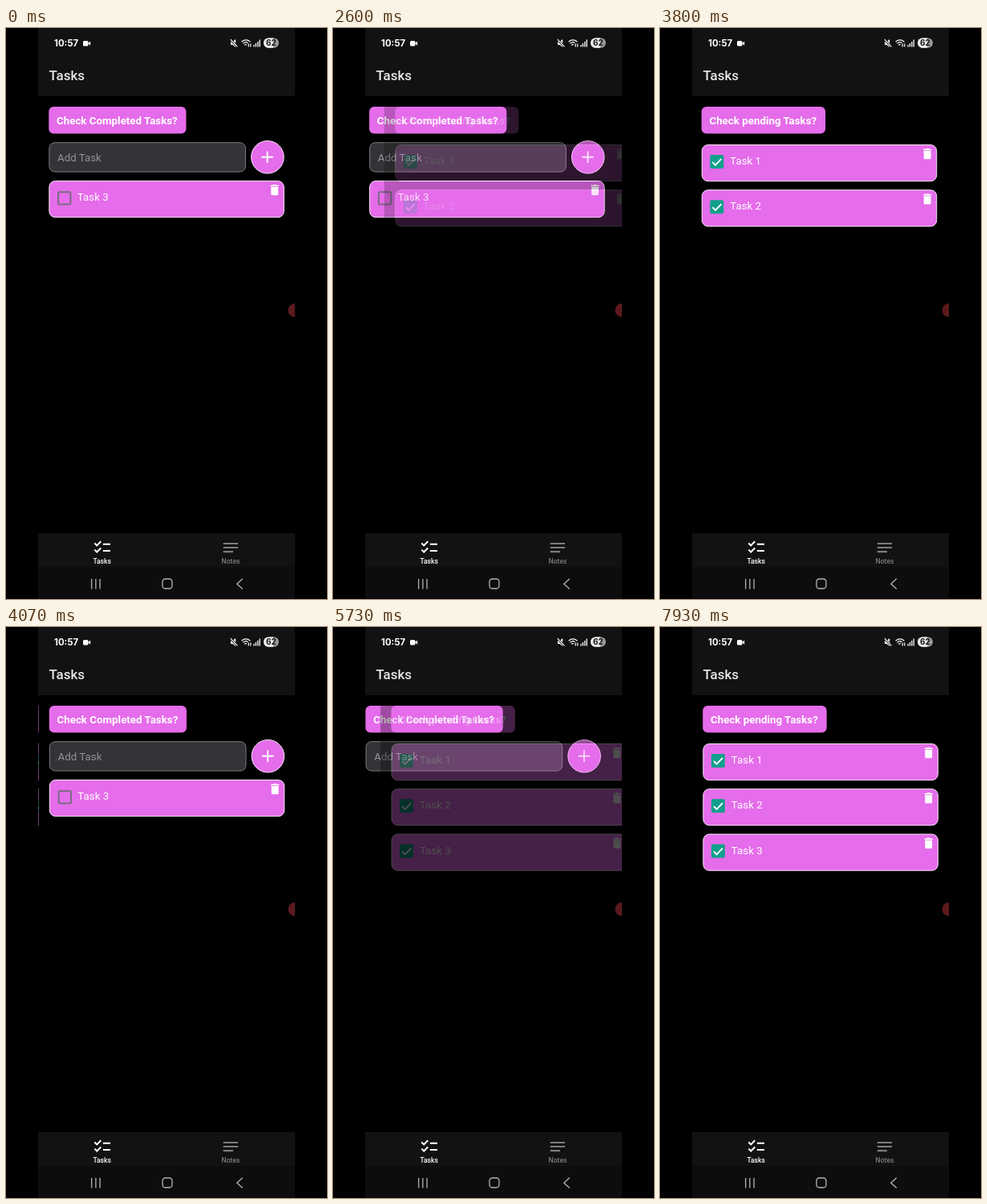
An HTML page for the animation above (8000 ms loop, 400 px wide and 711 px high).

```html
<!DOCTYPE html>
<html lang="en">
<head>
<meta charset="utf-8">
<title>Tasks</title>
<style>
  html, body { margin: 0; height: 100%; overflow: hidden; background: #000; }
  svg { display: block; width: 100vw; height: 100vh; }
  text { font-family: Roboto, sans-serif; font-size: 13.33px; fill: #fff; }
  .bold { font-weight: 700; }
  .medium { font-weight: 500; }
  .clock { font: 700 11.4px Inter, sans-serif; }
  .line { fill: none; stroke: #fff; }
</style>
</head>
<body>
<svg viewBox="0 0 400 711">
  <defs>
    <clipPath id="phone"><rect x="40" y="85" width="320" height="544"/></clipPath>
    <path id="trash" fill="#fff" d="M6 19c0 1.1.9 2 2 2h8c1.1 0 2-.9 2-2V7H6zM19 4h-3.5l-1-1h-5l-1 1H5v2h14z"/>
  </defs>
  <rect width="400" height="711"/>

  <g id="pages" clip-path="url(#phone)"></g>
  <circle cx="360" cy="351.5" r="8.5" fill="#5c191d" clip-path="url(#phone)"/>

  <!-- status bar and header -->
  <rect x="40" width="320" height="85" fill="#121113"/>
  <text class="clock" x="60" y="22.8">10:57</text>
  <rect x="96" y="16" width="6.5" height="6.5" rx="1.5" fill="#fff"/>
  <path d="M102 19.2l3.2-2.6v5.2z" fill="#fff"/>
  <path d="M280 17h2.4l3.8-3v10l-3.8-3H280z" fill="#fff"/>
  <path d="M279.5 14l9 9.5" stroke="#121113" stroke-width="2.6"/>
  <path class="line" d="M279.8 14.2l8.6 9.2" stroke-width="1.2"/>
  <path class="line" d="M293.6 17.2q5.4-4.6 10.8 0M295.4 19.4q3.6-3 6 -.6M297.2 21.4q1.6-1.4 2.6-.4M302.2 23.5v-4M304.8 19.5v4" stroke-width="1.2"/>
  <path class="line" d="M309 23.5v-2.5M311.4 23.5v-4.5M313.8 23.5v-6.5M316.2 23.5v-9" stroke-width="1.3"/>
  <rect x="321" y="12.5" width="19" height="12.2" rx="6.1" fill="#9a9a9c"/>
  <path d="M333 12.5h-5.9a6.1 6.1 0 0 0 0 12.2h5.9z" fill="#eee"/>
  <text class="clock" x="330.5" y="22.4" text-anchor="middle" style="font-size:10px;fill:#18171a">62</text>
  <text class="medium" x="53.5" y="65" style="font-size:17px;fill:#e8e8ea">Tasks</text>

  <!-- tab bar -->
  <rect x="40" y="629" width="320" height="42" fill="#121113"/>
  <path transform="translate(107.6 634.6) scale(1.02)" fill="#fff" d="M22 7h-9v2h9zm0 8h-9v2h9zM5.54 11L2 7.46l1.41-1.41 2.12 2.12 4.24-4.24 1.41 1.41zm0 8L2 15.46l1.41-1.41 2.12 2.12 4.24-4.24 1.41 1.41z"/>
  <path transform="translate(267.7 634.8) scale(1.02)" fill="#7c7b7e" d="M3 18h12v-2H3zM3 6v2h18V6zm0 7h18v-2H3z"/>
  <g class="medium" text-anchor="middle">
    <text x="119.7" y="667" style="font-size:8.6px">Tasks</text>
    <text x="280" y="667" style="font-size:8.6px;fill:#7c7b7e">Notes</text>
  </g>

  <!-- system navigation -->
  <rect x="40" y="671" width="320" height="40" fill="#0d0c0e"/>
  <g class="line" style="stroke:#b4b3b6" stroke-width="1.3">
    <path d="M106.7 686v12.5M111.9 686v12.5M117.1 686v12.5M294.8 685.8l-7 6.4 7 6.4"/>
    <rect x="195" y="686" width="12" height="12" rx="3.6"/>
  </g>
</svg>
<script>
const PINK = '#e56cea', LOOP = 8000, SLIDE = 450, SHIFT = 32;

const button = (label, width) => `
  <rect x="53.3" y="98" width="${width}" height="33.5" rx="6" fill="${PINK}"/>
  <text class="bold" x="63" y="119.6">${label}</text>`;

const checkbox = done => done
  ? `<rect x="10.5" y="13" width="17" height="17" rx="2" fill="#12a08c"/>
     <path class="line" d="M13.6 22l3.6 3.6 7.4-7.6" stroke-width="1.8"/>`
  : `<rect x="11.7" y="14.2" width="15.4" height="15.4" rx="1.5" fill="none" stroke="#7b6c80" stroke-width="2"/>`;

const card = (n, y, done) => `
  <g transform="translate(53.4 ${y})">
    <rect x=".5" y=".5" width="292.4" height="45.2" rx="7.5" fill="${PINK}" stroke="#fbe6fc"/>
    ${checkbox(done)}
    <text x="35.4" y="25">Task ${n}</text>
    <use href="#trash" transform="translate(272.4 2.8) scale(.741)"/>
  </g>`;

const page = content => `<rect x="40" y="85" width="320" height="544"/>${content}`;

const pending = tasks => page(button('Check Completed Tasks?', 171.2) + `
  <rect x="53.9" y="142.7" width="244.6" height="36.4" rx="7" fill="#353337" stroke="#7c7a7e"/>
  <text x="64" y="165.7" style="fill:#949296">Add Task</text>
  <circle cx="325.9" cy="160.8" r="20.3" fill="${PINK}" stroke="#fbe6fc"/>
  <path class="line" d="M318.5 160.7h14.4M325.7 153.5v14.4" stroke-width="1.9"/>`
  + tasks.map((n, i) => card(n, 190 + i * 56.25, false)).join(''));

const completed = tasks => page(button('Check pending Tasks?', 154.4)
  + tasks.map((n, i) => card(n, 145 + i * 56.25, true)).join(''));

// Each screen slides in over the previous one, unless it is a cut
const screens = [
  { at: 0, html: pending([3]), cut: true },
  { at: 2535, html: completed([1, 2]) },
  { at: 3767, html: pending([3]) },
  { at: 4990, html: pending([]), cut: true },
  { at: 5656, html: completed([1, 2, 3]) },
];
const pages = document.getElementById('pages');
pages.innerHTML = screens.map(s => `<g>${s.html}</g>`).join('');
const layers = [...pages.children];

const bezier = (a, b, c, d, s) => {
  const r = 1 - s;
  return r * r * r * a + 3 * r * r * s * b + 3 * r * s * s * c + s * s * s * d;
};

// Fast start, very slow finish: two cubic curves joined at (1/6, 0.4)
function ease(x) {
  if (x <= 0 || x >= 1) return x <= 0 ? 0 : 1;
  const [xs, ys] = x < 1 / 6
    ? [[0, .05, .133333, 1 / 6], [0, 0, .06, .4]]
    : [[1 / 6, .208333, .25, 1], [.4, .82, 1, 1]];
  let lo = 0, hi = 1;
  for (let i = 0; i < 30; i++) {
    const mid = (lo + hi) / 2;
    if (bezier(...xs, mid) < x) lo = mid; else hi = mid;
  }
  return bezier(...ys, lo);
}

function place(layer, dx, opacity) {
  layer.style.display = '';
  layer.setAttribute('transform', `translate(${dx} 0)`);
  layer.setAttribute('opacity', opacity);
}

function draw(t) {
  const current = screens.findLastIndex(s => s.at <= t);
  const { at, cut } = screens[current];
  const age = t - at;
  layers.forEach(layer => layer.style.display = 'none');
  if (cut || age >= SLIDE) return place(layers[current], 0, 1);
  const p = ease(age / SLIDE);
  place(layers[current - 1], -SHIFT * p, 1);
  place(layers[current], SHIFT * (1 - p), Math.min(1, Math.max(0, (age - 50) / 83)));
}

const start = performance.now();
function tick() {
  draw((performance.now() - start) % LOOP);
  requestAnimationFrame(tick);
}
tick();
</script>
</body>
</html>
```
